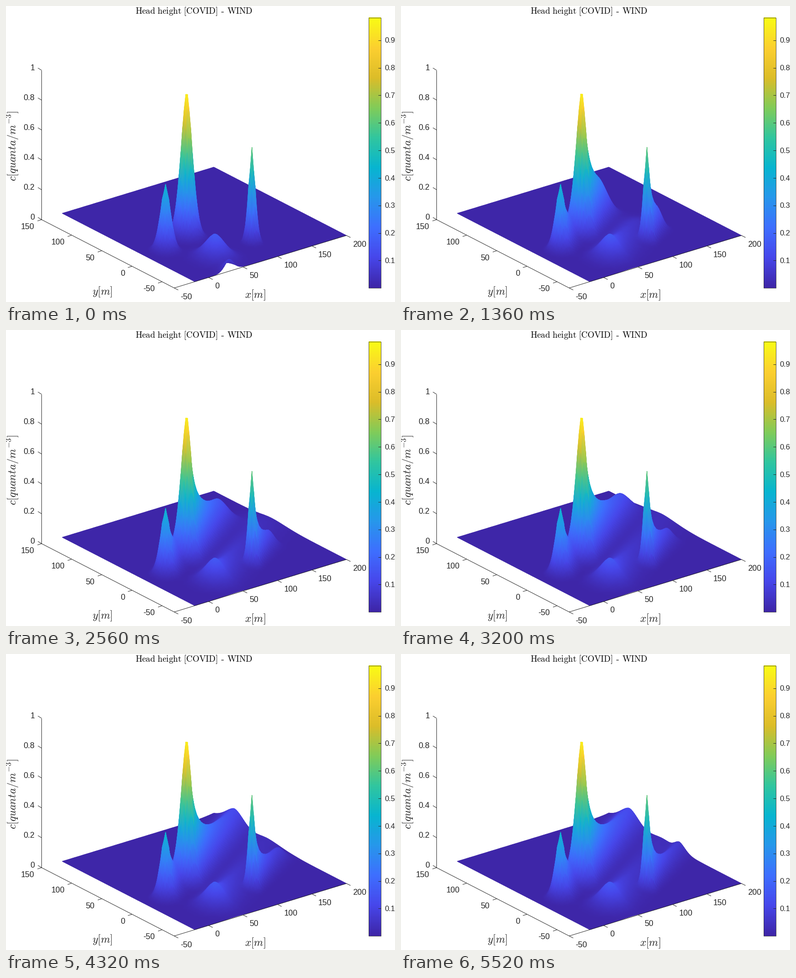
These frames come from a looping animation (857x654 px, 5600 ms). A matplotlib script:

```python
import numpy as np
import matplotlib.pyplot as plt
from matplotlib.animation import FuncAnimation
from matplotlib.colors import LinearSegmentedColormap
from matplotlib.patches import Rectangle

W, H, DPI = 857, 654, 100
FRAMES, STEP_MS = 70, 80
INK = (0.15, 0.15, 0.15)
Z_MAX = 0.982
PX = 72 / DPI

plt.rcParams["mathtext.fontset"] = "cm"
plt.rcParams["font.family"] = "Liberation Sans"

# Evenly spaced key colours, low to high
CMAP = LinearSegmentedColormap.from_list("heat", (
    "#3e26a8 #4747eb #3e6fff #2797eb #08b5d0 "
    "#31c69f #81cc59 #dcbd29 #fccf30 #f9fb15").split())

WIND = np.array([1, 0.61]) / np.hypot(1, 0.61)
SHARPNESS = 1.7

# Rows and columns run from far to near, so nearer cells paint over farther ones.
GX, GY = np.meshgrid(np.linspace(200, -20, 89), np.linspace(150, -70, 89))


def project(x, y, z=0):
    """Plot coordinates to stage pixels."""
    sx = 370.5 + 1.518 * (x + 50) - 1.328 * (y + 70)
    sy = 623 - 0.464 * (x + 50) - 0.6864 * (y + 70) - 330 * z
    return sx, sy


def bell(r):
    return np.exp(-np.abs(r)**SHARPNESS)


def plume(t, height, x0, y0, radius, speed):
    """A fixed peak whose tail is carried downwind behind a moving front."""
    dx, dy = GX - x0, GY - y0
    along = dx * WIND[0] + dy * WIND[1]
    across = dy * WIND[0] - dx * WIND[1]
    core = bell(np.hypot(dx, dy) / radius)

    down = np.maximum(along, 0)
    reach = speed * t + 20 * (1 - np.exp(-t / 4))
    front = 0.5 - 0.5 * np.tanh((down - reach) / (1.1 * radius))
    stretch = down / (2.55 * radius)
    width = radius * np.sqrt(1 + 0.45 * stretch)
    tail = front / (1 + stretch) * bell(across / width)
    return height * np.maximum(core, np.where(along > 0, tail, 0))


def stray_puff(t):
    """Small cloud at the near edge that soon thins out."""
    r = np.hypot(GX - 30 - 3 * t, GY + 70 - 2 * t)
    return 0.08 * np.exp(-t / 2) * bell(r / 9.5)


def surface(t):
    parts = (
        plume(t, height=0.990, x0=51.2, y0=25.0, radius=9.0, speed=3.4),
        plume(t, height=0.447, x0=7.5, y0=10.0, radius=8.0, speed=3.0),
        plume(t, height=0.643, x0=100, y0=-27.5, radius=5.2, speed=1.55),
        plume(t, height=0.162, x0=40, y0=-35, radius=16.5, speed=5.3),
        stray_puff(t),
    )
    return np.sqrt(sum(p**2 for p in parts))


fig = plt.figure(figsize=(W / DPI, H / DPI), dpi=DPI, facecolor="white")
ax = fig.add_axes([0, 0, 1, 1])


def line(p, q, color=INK, width=1.0):
    ax.plot([p[0], q[0]], [p[1], q[1]], color=color, lw=width * PX,
            solid_capstyle="butt", zorder=5)


def label(x, y, text, ha, px=17.7):
    ax.text(x, y + 0.34 * px, text, ha=ha, va="baseline",
            fontsize=px * PX, color=INK)


def formula(x, y, text, px, color=INK, **kw):
    ax.text(x, y, f"${text}$", fontsize=px * PX, color=color, **kw)


def tick(p, dx, dy):
    line(p, (p[0] + dx, p[1] + dy))


def draw_axes():
    left, near, right = project(-50, 150), project(-50, -70), project(200, -70)
    line(left, project(-50, 150, 1))
    line(left, near)
    line(near, right)
    for z in np.linspace(0, 1, 6):
        p = project(-50, 150, z)
        tick(p, -8, -5)
        label(63.5, p[1] - 6.5, f"{z:.1g}", "right")
    for y in range(-50, 151, 50):
        p = project(-50, y)
        tick(p, -9, 3)
        label(p[0] - 15.5, p[1] + 15, str(y), "right")
    for x in range(-50, 201, 50):
        p = project(x, -70)
        tick(p, 9, 4.5)
        label(p[0] + 14, p[1] + 18.5, str(x), "left")


def draw_colorbar():
    x0, x1, top, bottom = 799.2, 826.2, 26, 623.2
    ramp = np.linspace(1, 0, 256)[:, None]
    ax.imshow(ramp, cmap=CMAP, extent=(x0, x1, bottom, top),
              aspect="auto", interpolation="bilinear", zorder=2)
    ax.add_patch(Rectangle((x0, top), x1 - x0, bottom - top, fill=False,
                           ec=INK, lw=0.8 * PX, zorder=5))
    for i in range(1, 10):
        y = bottom - (bottom - top) * i / 10 / Z_MAX
        line((x1 - 6, y), (x1, y))
        label(834, y, f"0.{i}", "left", 16.5)


def draw_titles():
    formula(285, 17, r"\mathrm{Head\ height\ [COVID]}", 19.15, "black")
    line((474, 12.5), (479.5, 12.5), "black", 1.3)
    formula(487.5, 17, r"\mathrm{WIND}", 19.15, "black")
    mid = dict(ha="center", va="center")
    formula(212.5, 632, "y[m]", 23.6, **mid)
    formula(549.5, 639, "x[m]", 23.6, **mid)
    formula(15, 309, "c[quanta/m^{-3}]", 24.4, rotation=90, **mid)


draw_axes()
draw_colorbar()
draw_titles()
ax.set_xlim(0, W)
ax.set_ylim(H, 0)
ax.axis("off")
mesh = None


def update(i):
    global mesh
    if mesh is not None:
        mesh.remove()
    z = surface(i)
    sx, sy = project(GX, GY, z)
    mesh = ax.pcolormesh(sx, sy, z, cmap=CMAP, vmin=0, vmax=Z_MAX,
                         shading="gouraud", zorder=3)
    return [mesh]


anim = FuncAnimation(fig, update, frames=FRAMES, interval=STEP_MS,
                     init_func=lambda: [], repeat=True, repeat_delay=0)
plt.show()
```
